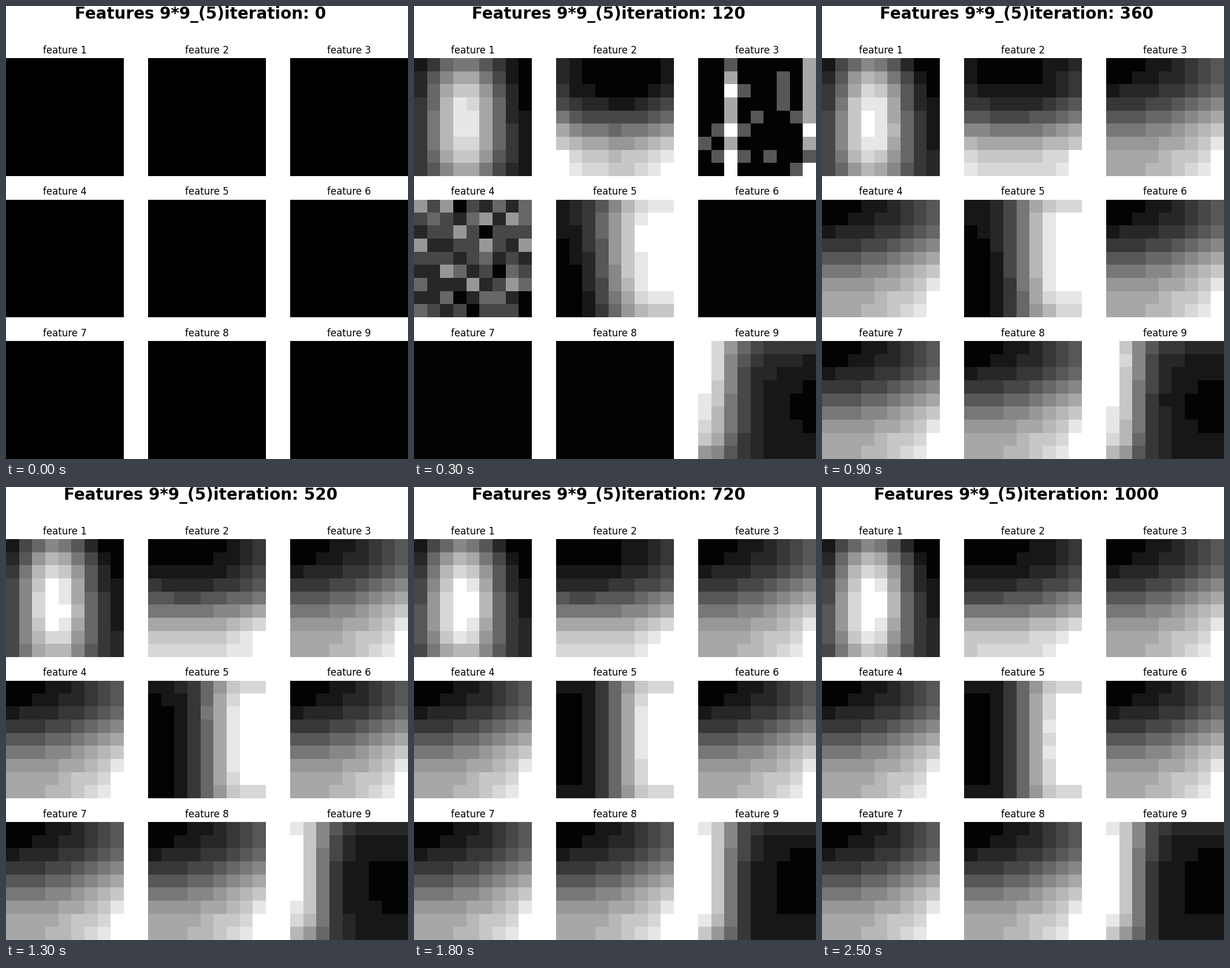
Animation, 696 px wide and 783 px high, one loop 2.6 s. Source, as a matplotlib script:

```python
import numpy as np
import matplotlib.pyplot as plt
from matplotlib.animation import FuncAnimation

W, H, DPI = 696, 783, 87
PT = 100 / DPI  # point sizes below are meant for 100 dpi
FRAMES, INTERVAL, STEP = 26, 100, 40
N, LEVELS = 9, 15
PANEL, PITCH_X, PITCH_Y = 203.8, 246.1, 244.6

plt.rcParams["font.family"] = "DejaVu Sans"

# Cell coordinates from 0 to 1; y runs downwards.
x = np.linspace(0, 1, N)[None, :]
y = np.linspace(0, 1, N)[:, None]
BLACK = np.zeros((N, N))


def ease(t):
    return (1 - np.cos(np.pi * np.clip(t, 0, 1))) / 2


def mix(a, b, t):
    return a + (b - a) * np.clip(t, 0, 1)


def coarse(values, steps):
    return np.round(np.clip(values, 0, LEVELS) / LEVELS * steps) / steps * LEVELS


def blob(t):
    """Upright bright spot."""
    column = mix(14.3, 15, t) * np.exp(-((x - mix(.425, .4, t)) / .35) ** 2)
    return column * (1.04 - 1.6 * (y - .52) ** 2) + mix(1.5, 2.6, t) * y - 1.1


def floor(t):
    """Dark above, bright below."""
    dip = 11 * (x - .53) ** 2 - 1.2
    return mix(13.5, 12.5, t) * ease(y ** 1.3) + mix(dip, 3.2 * x ** 3, t)


def right_wall(t):
    column = 15.3 * ease((1.12 * x) ** mix(1.1, 1.45, t))
    shift = mix(1.4 - 2.4 * y, .6 * (2 * y - 1) ** 2, t)
    return column * (1 - .18 * (2 * y - 1) ** 4) + shift


def left_wall(t):
    column = (mix(13.5, 15.2, t) * np.exp(-(x / .29) ** 1.8)
              + mix(1.5, 0, t) * (1 - x))
    scale = 1 - .18 * (2 * y - 1) ** 4 - mix(.25, .1, t) * y ** 2
    return column * scale + mix(2.8, 1.8, t) * (1 - y) ** 5 + .7 * y ** 2


def make_notch():
    rows = 9.2 / (1 + np.exp(-12 * (y - .5))) + 3 * (1 - y) ** 6
    return rows + 24 * (x - .47) ** 2 + 2 * (1 - 2 * y) * (x - .5)


def make_bars():
    """Sparse specks with two bright columns."""
    chance = np.where(np.isin(np.arange(N), (2, 8)), .7, .07)
    return LEVELS / 3 * np.random.default_rng(3).binomial(3, chance, (N, N))


def make_noise():
    return LEVELS / 7 * np.random.default_rng(4).binomial(7, .25, (N, N))


NOTCH, BARS, NOISE = make_notch(), make_bars(), make_noise()
SLOPE = 10 * ease(y) + 5 * x ** 2


def early(i, pattern):
    """Coarse at first, then settling ever more slowly."""
    left = 1 - max(i - 3, 0) / (FRAMES - 4)
    values = pattern(1 - left ** 3)
    return coarse(values, 5 * i) if i < 3 else values


def late(i, first, start):
    """Dark until `first`, then the notch, which turns into the slope."""
    if i < first:
        return BLACK
    return mix(mix(start, NOTCH, (i - 3) / 2), SLOPE, (i - 6) / 3)


def features(i):
    follower = late(i, 5, NOTCH)
    return [
        early(i, blob), early(i, floor), late(i, 3, BARS),
        late(i, 2, NOISE), early(i, right_wall), follower,
        follower, follower, early(i, left_wall),
    ]


def shade(values):
    level = np.round(np.clip(values, 0, LEVELS))
    return np.select([level == 0, level == LEVELS], [3, 255], 16 * level + 7)


fig = plt.figure(figsize=(W / DPI, H / DPI), dpi=DPI, facecolor="white")
heading = fig.text(336.5 / W, 1, "", ha="center", va="top",
                   fontsize=20 * PT, fontweight="bold")
images = []
for row in range(3):
    for col in range(3):
        ax = fig.add_axes((col * PITCH_X / W, (2 - row) * PITCH_Y / H,
                           PANEL / W, PANEL / H))
        ax.axis("off")
        images.append(ax.imshow(BLACK, cmap="gray", vmin=0, vmax=255,
                                interpolation="nearest", aspect="auto"))
        ax.set_title(f"feature {len(images)}", fontsize=12 * PT, pad=6 * PT)


def update(i):
    heading.set_text(f"Features 9*9_(5)iteration: {i * STEP}")
    panels = map(shade, features(i)) if i else [BLACK] * 9
    for image, values in zip(images, panels):
        image.set_data(values)
    return [heading, *images]


anim = FuncAnimation(fig, update, frames=FRAMES, interval=INTERVAL,
                     repeat=True, repeat_delay=0, blit=False)
plt.show()
```
